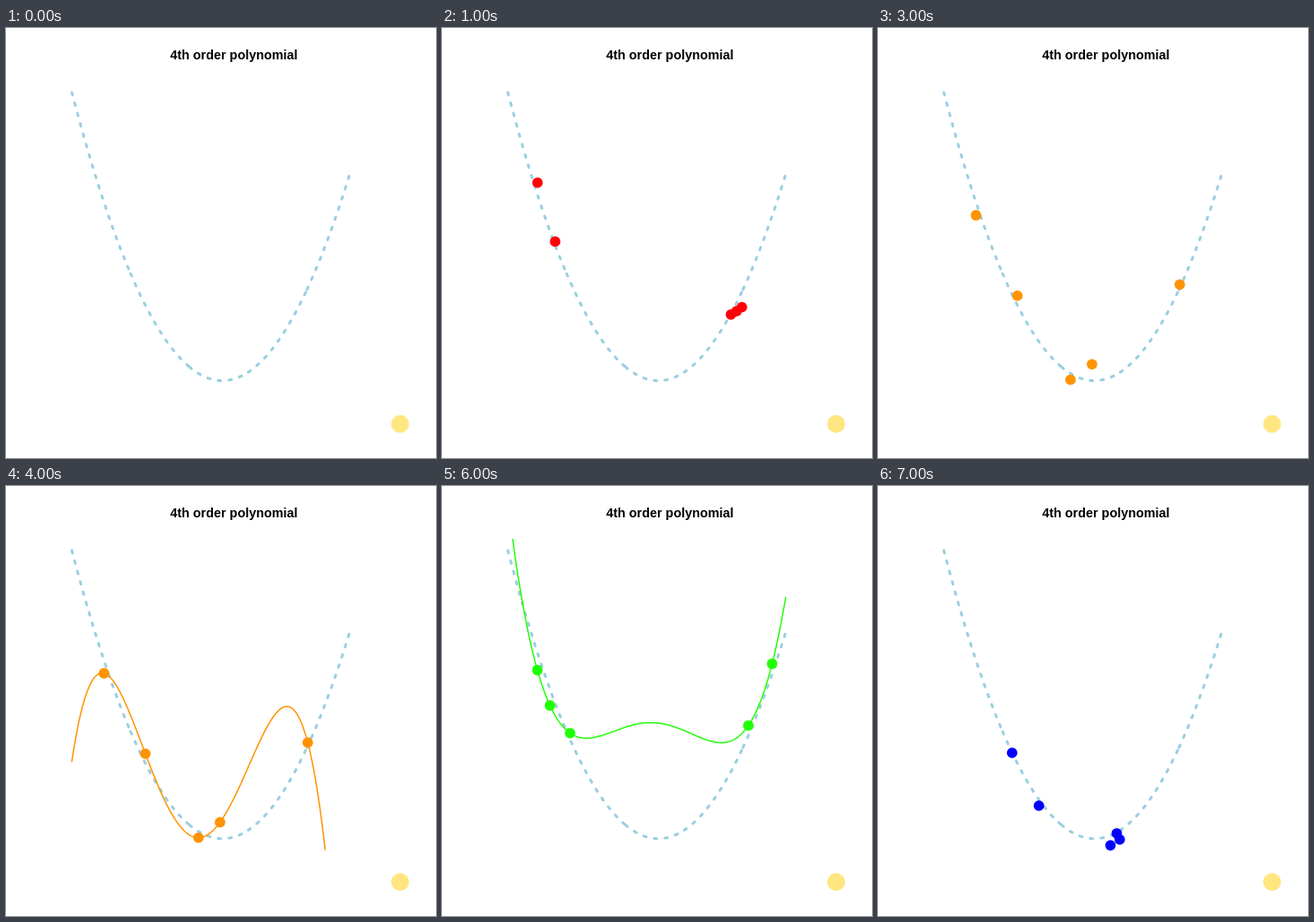
An HTML page with a canvas for the animation above (8 s loop, 480x480 px).

```html
<!DOCTYPE html>
<html lang="en">
<head>
<meta charset="utf-8">
<title>4th order polynomial</title>
<style>
  html, body { margin: 0; width: 100%; height: 100%; overflow: hidden; background: #fff; }
  canvas { display: block; width: 480px; height: 480px; }
</style>
</head>
<body>
<canvas id="stage" width="480" height="480"></canvas>
<script>
const ctx = document.getElementById('stage').getContext('2d');
const STEP = 1000, LOOP = 8000;
const LEFT = 73.5, RIGHT = 383.6;

const truth = x => 393.7 - 0.0114 * (x - 241.5) ** 2;

// A sample is the true curve at a few places plus noise.
const sample = (color, xs, noise) =>
  ({ color, dots: xs.map((x, i) => [x, truth(x) + noise[i]]) });

const samples = [
  sample('#ff0008', [106.63, 126.3, 322.5, 328.7, 334.8], [-13.665, -4.11, 0.895, 9.185, 17.175]),
  sample('#ff9300', [109.4, 155.6, 214.9, 238.9, 336.8], [14.24, -10.78, 6.97, -18.32, -3.86]),
  sample('#21ff06', [106.5, 120.5, 143, 342, 368.5], [19.57, 18.21, -7.29, -11.16, -11.33]),
  sample('#0000ff', [149.7, 179.6, 259.5, 266.5, 269.8], [0.2, 6.9, 11.1, 1.2, 10])
];

// The quartic through all five dots, in Lagrange form.
const quartic = dots => x => dots.reduce((sum, [xi, yi]) =>
  sum + dots.reduce((p, [xj]) => xi === xj ? p : p * (x - xj) / (xi - xj), yi), 0);

function plot(f, from, to) {
  const n = 300;
  ctx.beginPath();
  for (let i = 0; i <= n; i++) {
    const x = from + (to - from) * i / n;
    ctx.lineTo(x, f(x));
  }
  ctx.stroke();
}

function disc(x, y, r) {
  ctx.beginPath();
  ctx.arc(x, y, r, 0, 2 * Math.PI);
  ctx.fill();
}

// The dash pattern starts afresh with every section.
function drawTruth() {
  const section = 65.63;
  ctx.strokeStyle = '#9bcfe1';
  ctx.lineWidth = 3;
  ctx.setLineDash([3, 9]);
  for (let x = LEFT; x < RIGHT; x += section) plot(truth, x, Math.min(x + section, RIGHT));
  ctx.setLineDash([]);
}

function drawDots({ color, dots }) {
  ctx.fillStyle = color;
  for (const [x, y] of dots) disc(x, y, 5.9);
}

function drawFit({ color, dots }) {
  ctx.save();
  ctx.beginPath();
  ctx.rect(59, 59, 390.8, 347.5);
  ctx.clip();
  ctx.strokeStyle = color;
  ctx.lineWidth = 1.5;
  plot(quartic(dots), LEFT, RIGHT);
  ctx.restore();
}

function drawBase() {
  ctx.fillStyle = '#fff';
  ctx.fillRect(0, 0, 480, 480);
  ctx.fillStyle = '#000';
  ctx.font = 'bold 14.4px "Liberation Sans", Arial, sans-serif';
  ctx.textAlign = 'center';
  ctx.fillText('4th order polynomial', 254.4, 35);
  ctx.fillStyle = '#ffe680';
  disc(440, 442, 10);
  drawTruth();
}

// Each sample shows its dots for one step, then adds the fit for another.
function draw(step) {
  drawBase();
  if (step === 0) return;
  const current = samples[Math.floor((step - 1) / 2)];
  drawDots(current);
  if (step % 2 === 0) drawFit(current);
}

ctx.lineCap = ctx.lineJoin = 'round';
const start = performance.now();
function tick() {
  draw(Math.floor(((performance.now() - start) % LOOP) / STEP));
  requestAnimationFrame(tick);
}
tick();
</script>
</body>
</html>
```
